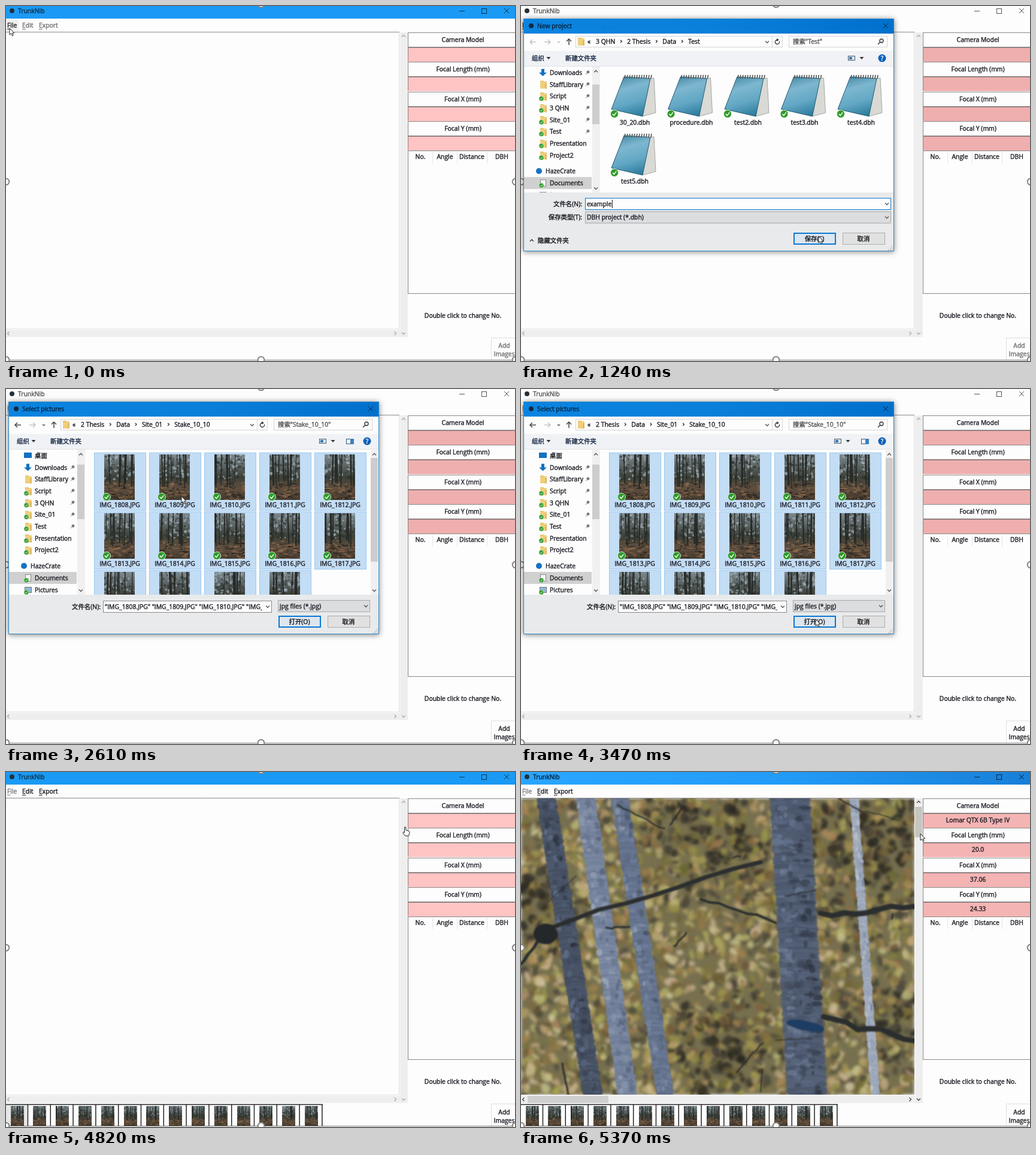
An HTML page with a canvas for the animation above (5450 ms loop, 850 by 592 pixels).

```html
<!DOCTYPE html>
<html lang="en">
<head>
<meta charset="utf-8">
<title>Tree measuring tool</title>
<style>
html, body { margin: 0; width: 100%; height: 100%; overflow: hidden; background: #fdfdfd; }
canvas { display: block; }
</style>
</head>
<body>
<canvas id="stage" width="850" height="592"></canvas>
<script>
const LOOP = 5450, WHITE = '#fdfdfd', INK = '#1c1c24', BLUE = '#0a78d4', NAVY = '#06243e';
const FONT = '10.4px "Open Sans", "Noto Sans CJK SC", "Noto Sans CJK", sans-serif';

// Moments of the story, in ms
const OPEN_NEW = 540, PROJECT = 1650, OPEN_PICK = 2290, SELECT = 2500, PICKED = 3780, THUMBS = 4110, LOADED = 5050;

// Each pointer move: start time and goal
const MOVE_TIME = 310;
const moves = [
  [0, 6, 37], [890, 497, 384], [1710, 814, 565], [2260, 293, 179],
  [2950, 492, 384], [3970, 18, 572], [4470, 667, 92], [LOADED, 667, 103]
];

let c = document.getElementById('stage').getContext('2d');

function rect(x, y, w, h, fill, stroke, width = 1) {
  if (fill) { c.fillStyle = fill; c.fillRect(x, y, w, h); }
  if (stroke) {
    c.strokeStyle = stroke; c.lineWidth = width;
    c.strokeRect(x + width / 2, y + width / 2, w - width, h - width);
  }
}
function trace(points) {
  c.beginPath();
  points.forEach(([x, y]) => c.lineTo(x, y));
}
function line(points, color, width = 1) {
  trace(points);
  c.strokeStyle = color; c.lineWidth = width; c.stroke();
}
function poly(points, fill, stroke) {
  trace(points);
  c.closePath();
  c.fillStyle = fill; c.fill();
  if (stroke) { c.strokeStyle = stroke; c.lineWidth = 1; c.stroke(); }
}
function disc(x, y, r, fill, stroke, width = 1) {
  c.beginPath(); c.arc(x, y, r, 0, 7);
  if (fill) { c.fillStyle = fill; c.fill(); }
  if (stroke) { c.strokeStyle = stroke; c.lineWidth = width; c.stroke(); }
}
function text(s, x, y, color = INK, align = 'left') {
  c.font = FONT; c.textAlign = align;
  c.fillStyle = c.strokeStyle = color; c.lineWidth = 0.4;
  c.fillText(s, x, y + 3.8); c.strokeText(s, x, y + 3.8);
  return c.measureText(s).width;
}
function chevron(x, y, dir, color = '#555', s = 3) {
  const [dx, dy] = { up: [0, -1], down: [0, 1], left: [-1, 0], right: [1, 0] }[dir];
  const h = s / 2;
  line([[x - dx * h - dy * s, y - dy * h - dx * s], [x + dx * h, y + dy * h],
        [x - dx * h + dy * s, y - dy * h + dx * s]], color, 1.3);
}
function arrow(x, y, dir, color) {
  const d = dir === 'left' ? -1 : 1;
  line([[x - 5, y], [x + 5, y]], color, 1.3);
  chevron(x + d * 3, y, dir, color, 4);
}
function triangle(x, y) {
  poly([[x - 3.5, y - 2], [x + 3.5, y - 2], [x, y + 2]], '#333');
}
function cross(x, y, color) {
  line([[x - 4, y - 4], [x + 4, y + 4]], color);
  line([[x - 4, y + 4], [x + 4, y - 4]], color);
}
function check(x, y, r) {
  disc(x, y, r, '#2f9a2a', '#e8f4e6', r / 7);
  line([[x - r * .5, y], [x - r * .1, y + r * .4], [x + r * .5, y - r * .4]], '#fff', r / 4.5);
}
function gradient(x0, y0, x1, y1, colors) {
  const g = c.createLinearGradient(x0, y0, x1, y1);
  colors.forEach((k, i) => g.addColorStop(i / Math.max(1, colors.length - 1), k));
  return g;
}
function clipped(x, y, w, h, drawInside) {
  c.save();
  c.beginPath(); c.rect(x, y, w, h); c.clip();
  drawInside();
  c.restore();
}

// Off-screen pictures
function random(seed) {
  return () => (seed = (seed * 16807) % 2147483647) / 2147483647;
}
function paint(w, h, drawInside) {
  const page = document.createElement('canvas'), screen = c;
  page.width = w; page.height = h;
  c = page.getContext('2d');
  drawInside();
  c = screen;
  return page;
}
function blob(x, y, rx, ry, color, turn = 0) {
  c.beginPath(); c.ellipse(x, y, rx, ry, turn, 0, 7);
  c.fillStyle = color; c.fill();
}
function makeThumb(seed) {
  return paint(51, 76, () => {
    const r = random(seed * 7919 + 11);
    rect(0, 0, 51, 76, gradient(0, 0, 0, 76, ['#7d8a90', '#5c6565', '#3c4038', '#5f4e3e', '#443a2e']));
    for (let i = 0; i < 70; i++) {
      blob(r() * 51, r() * 42, 1 + r() * 2, 1 + r() * 2, r() < .5 ? 'rgba(165,180,188,.6)' : 'rgba(40,46,44,.6)');
      blob(r() * 51, 46 + r() * 30, 1 + r() * 4, .5 + r(), r() < .5 ? 'rgba(150,112,80,.6)' : 'rgba(36,34,28,.6)');
    }
    for (let i = 0; i < 9; i++) {
      const x = r() * 51;
      line([[x, 0], [x + r() * 4 - 2, 44 + r() * 14]], '#272a27', 1 + r() * 1.6);
    }
  });
}
const thumbs = Array.from({ length: 14 }, (_, i) => makeThumb(i + 1));

const PHOTO_W = 657, PHOTO_H = 494;
const photo = paint(PHOTO_W, PHOTO_H, () => {
  const r = random(4242), spread = n => (r() * 2 - 1) * n;
  // Foliage: soft flecks, darker near the shadow centres [x, y, radius]
  const shadows = [[310, 60, 90], [590, 90, 110], [20, 190, 60], [330, 420, 85], [610, 370, 55]];
  c.filter = 'blur(2.5px)';
  rect(0, 0, PHOTO_W, PHOTO_H, '#77704f');
  for (let i = 0; i < 3000; i++) {
    const x = r() * PHOTO_W, y = r() * PHOTO_H;
    const shade = shadows.reduce((sum, [sx, sy, s]) => sum + Math.exp(-((x - sx) ** 2 + (y - sy) ** 2) / (s * s)), 0);
    const light = Math.max(14, 49 - 27 * Math.min(1, shade) + spread(25));
    blob(x, y, 3 + r() * 8, 2 + r() * 6, `hsl(${45 + spread(14)} ${light < 30 ? 12 : 34}% ${light}% / .8)`, r() * 3);
  }
  // Trunks: x at top, x at bottom, width, lightness
  const trunks = [[556, 592, 14, 68], [42, 120, 33, 34], [108, 178, 33, 54], [165, 241, 29, 48], [449, 478, 68, 38]];
  c.filter = 'blur(1.2px)';
  for (const [x0, x1, w, light] of trunks) {
    const place = y => x0 + (x1 - x0) * y / PHOTO_H;
    for (let y = 0; y <= PHOTO_H; y += 3) blob(place(y), y, w / 2 + spread(1.5), 5, `hsl(219 17% ${light + spread(3)}%)`);
    for (let i = 0; i < w * 5; i++) {
      const y = r() * PHOTO_H, side = spread(.42);
      const tone = light + spread(14) - side * 18;
      blob(place(y) + side * w, y, 2 + r() * w * .12, 2 + r() * 5, `hsl(219 17% ${tone}% / .6)`);
    }
  }
  // Branches: start, end, width; then random twigs
  const branch = (x0, y0, x1, y1, w) => {
    const points = Array.from({ length: 9 }, (_, i) => [x0 + (x1 - x0) * i / 8, y0 + (y1 - y0) * i / 8 + spread(w * .7)]);
    line(points, '#2b2e2f', w);
  };
  c.lineCap = c.lineJoin = 'round';
  branch(40, 215, 400, 108, 7);
  branch(500, 196, PHOTO_W, 182, 9);
  branch(505, 364, PHOTO_W, 406, 9);
  branch(300, 166, 425, 206, 4);
  branch(0, 275, 45, 220, 5);
  for (let i = 0; i < 14; i++) {
    const x = r() * PHOTO_W, y = r() * PHOTO_H;
    branch(x, y, x + spread(90), y + spread(60), 1 + r() * 2);
  }
  blob(41, 226, 20, 17, '#25282b');
  blob(475, 379, 32, 8, '#1d3d63', .2);
});

// Main window
function themeAt(t, dialog) {
  if (dialog) return { bar: [WHITE], ink: '#555', pink: '#efafaf' };
  if (t >= PICKED && t < 4280) return { bar: ['#0a88e2', '#0a84dd', '#006ac4'], ink: NAVY, pink: '#efafaf' };
  if (t >= LOADED) return { bar: ['#2aa6ff', '#229cf8', '#187fd8'], ink: NAVY, pink: '#f5b4b4' };
  return { bar: ['#1a9af4'], ink: '#0b3350', pink: '#ffc4c4' };
}
function menuItem(s, x, color) {
  text(s, x, 32, color);
  line([[x, 38.5], [x + c.measureText(s[0]).width, 38.5]], color);
}
function titleBar(theme) {
  rect(0, 0, 850, 21, gradient(0, 0, 850, 0, theme.bar));
  disc(10, 8, 4, '#24303a');
  text('TrunkNib', 20, 8, theme.ink);
  line([[757, 8.5], [766, 8.5]], theme.ink);
  rect(794, 4, 9, 9, null, theme.ink);
  cross(836, 8, theme.ink);
}
function viewer(loaded) {
  const ink = loaded ? '#444' : '#aaa';
  line([[0, 43.5], [657, 43.5]], '#8c8c8c');
  line([[656.5, 44], [656.5, 539]], '#dcdcdc');
  line([[0, 538.5], [657, 538.5]], '#e2e2e2');
  rect(658, 44, 13, 508, '#eeeeee');
  rect(0, 540, 658, 12, '#eeeeee');
  if (loaded) {
    c.drawImage(photo, 0, 44);
    rect(658, 58, 12, 51, '#c6c6be');
    rect(11, 540, 135, 12, '#cfcfcf');
  }
  chevron(664, 50, 'up', ink); chevron(664, 546, 'down', ink);
  chevron(4, 546, 'left', ink); chevron(650, 546, 'right', ink);
}
function sidePanel(loaded, pink) {
  const fields = {
    'Camera Model': 'Lomar QTX 6B Type IV', 'Focal Length (mm)': '20.0',
    'Focal X (mm)': '37.06', 'Focal Y (mm)': '24.33'
  };
  Object.entries(fields).forEach(([label, value], i) => {
    const y = Math.round(44 + i * 49.4);
    rect(671, y, 181, 25, WHITE, '#8a8a8a');
    rect(671, y + 25, 181, 24, pink);
    line([[850, y + 25.5], [671.5, y + 25.5], [671.5, y + 48]], '#947a7a');
    text(label, 763, y + 12, INK, 'center');
    if (loaded) text(value, 763, y + 36.5, INK, 'center');
  });
  rect(671, 241, 181, 239, WHITE, '#8a8a8a');
  [['No.', 692], ['Angle', 733], ['Distance', 778], ['DBH', 828]].forEach(([s, x]) => text(s, x, 251, INK, 'center'));
  [712.5, 753.5, 803.5].forEach(x => line([[x, 243], [x, 262]], '#e4e4e4'));
  text('Double click to change No.', 763, 516, INK, 'center');
}
function thumbStrip(t) {
  thumbs.forEach((img, i) => {
    const x = i * 37.8, active = i === 0 && t > 4280 && t < LOADED;
    rect(x, 555, 36, 36, active ? '#e6e6e6' : WHITE);
    c.drawImage(img, x + 7.5, 557, 22, 33);
    line([[x + 36.5, 554], [x + 36.5, 590]], '#222', 1.5);
  });
  line([[0, 554.5], [529, 554.5]], '#222', 1.5);
}
function mainWindow(t, theme) {
  const project = t >= PROJECT, loaded = t >= LOADED, strip = t >= THUMBS;
  const ink = project ? INK : '#707070';
  rect(0, 0, 850, 592, WHITE);
  titleBar(theme);
  if (!project) rect(0, 22, 21, 20, '#f0f0f0');
  menuItem('File', 2, project ? '#777' : INK);
  menuItem('Edit', 27, ink);
  menuItem('Export', 55, ink);
  viewer(loaded);
  sidePanel(loaded, theme.pink);
  const y = strip ? 567 : 566;
  rect(810, 553, 42, 38, WHITE, '#e0e0e0');
  text('Add', 832, y, ink, 'center');
  text('Images', 832, y + 14, ink, 'center');
  if (strip) thumbStrip(t);
}
function frameHandles() {
  const handle = (x, y) => disc(x, y, 5.3, WHITE, '#868686', 2);
  line([[0, 590.5], [850, 590.5]], '#777');
  for (const x of [0, 851]) { handle(x, 293); handle(x, 590); }
  handle(426, -3); handle(426, 590);
}

// File dialogs
function folder(x, y) {
  rect(x, y - 6, 6, 3, '#d9b25c');
  rect(x, y - 5, 11, 12, '#f0cf7c');
  rect(x + 8, y - 2, 3, 9, '#e2bb62');
}
function button(s, x, main) {
  rect(x, 378, 71, 20, main ? '#dde6ee' : '#e1e1e1', main ? BLUE : '#adadad', main ? 2 : 1);
  text(s, x + 35, 388, INK, 'center');
}
function field(x, y, w, value, { fill = '#dbdddf', edge = '#a8a8a8' } = {}) {
  rect(x, y, w, 20, fill, edge);
  clipped(x, y, w - 16, 20, () => text(value, x + 3, y + 10));
  chevron(x + w - 7, y + 10, 'down');
}
function sidebar(pick, bottom) {
  const row = 19.7, top = pick ? 111 : 111 - row;
  ['桌面', 'Downloads', 'StaffLibrary', 'Script', '3 QHN', 'Site_01', 'Test', 'Presentation', 'Project2'].forEach((s, i) => {
    const y = top + i * row;
    if (i === 0) rect(30, y - 5, 13, 9, '#1471c0');
    else if (i === 1) { rect(34, y - 6, 5, 7, '#1471c0'); poly([[30, y], [43, y], [36.5, y + 6]], '#1471c0'); }
    else folder(32, y);
    if (i > 2) check(34, y + 4, 4);
    text(s, 48, y);
    if (i > 0 && i < 7) {
      line([[108, y + 3], [111, y]], '#777');
      poly([[109, y - 1], [112, y - 4], [115, y - 1], [112, y + 2]], '#777');
    }
  });
  const cloud = top + 184, y = cloud + 20;
  disc(30, cloud, 5, '#1673c4');
  text('HazeCrate', 41, cloud);
  rect(5, y - 10, 113, 20, '#d0d0d0');
  rect(32, y - 6, 10, 12, '#f6f6f6', '#888');
  check(34, y + 4, 4);
  text('Documents', 48, y);
  rect(31, y + 15, 12, 10, '#8fb8d8', '#777');
  check(34, y + 24, 4);
  text('Pictures', 48, y + 20);
  rect(4, 101, 127, 3, WHITE);
  rect(119, 101, 13, bottom - 101, '#f0f0f0');
  rect(119, pick ? 126 : 131, 12, pick ? 91 : 66, '#cdcdcd');
  chevron(125, 109, 'up'); chevron(125, bottom - 7, 'down');
}
function notebook(x, y, name) {
  poly([[x + 62, y + 9], [x + 71, y + 7], [x + 74, y + 65], [x + 52, y + 71]], '#d9d9d5', '#a6a6a2');
  const cover = gradient(x + 20, y, x + 40, y + 72, ['#3f829f', '#7db7cf', '#62a7c4', '#2b7a9c']);
  poly([[x + 21, y + 5], [x + 65, y + 8], [x + 52, y + 71], [x, y + 59]], cover, '#245a70');
  for (let i = 0; i < 12; i++) line([[x + 23 + i * 4, y + 2], [x + 22 + i * 4, y + 8]], '#555', 1.6);
  check(x + 5, y + 67, 6.5);
  text(name, x + 39, y + 81, INK, 'center');
}
function pictureCell(i, selected) {
  const x = 147 + i % 5 * 92, y = 106 + Math.floor(i / 5) * 98;
  if (selected) rect(x, y, 87, 97, '#c3ddf5', '#9cc8ee');
  c.drawImage(thumbs[i], x + 17, y + 3);
  check(x + 21, y + 74, 6.5);
  text(`IMG_${1808 + i}.JPG`, x + 43, y + 87.5, INK, 'center');
}
function addressBar(pick) {
  const path = pick ? ['2 Thesis', 'Data', 'Site_01', 'Stake_10_10'] : ['3 QHN', '2 Thesis', 'Data', 'Test'];
  rect(5, 46, 617, 29, WHITE);
  arrow(20, 60, 'left', pick ? '#333' : '#bbb');
  arrow(44, 60, 'right', '#bbb');
  chevron(63, 60, 'down', pick ? '#555' : '#bbb', 2);
  line([[80, 65], [80, 55]], '#333', 1.4); chevron(80, 57, 'up', '#333', 4);
  rect(91, 50, 346, 19, WHITE, '#d5d5d5');
  folder(95, 59);
  text('«', 111, 59);
  let x = 125;
  path.forEach((s, i) => {
    if (i) { chevron(x + 10, 59, 'right', '#333', 2.2); x += 20; }
    x += text(s, x, 59);
  });
  chevron(411, 60, 'down');
  line([[419.5, 50], [419.5, 69]], '#d5d5d5');
  c.beginPath(); c.arc(428, 60, 3.6, -.3, 4.6); c.strokeStyle = '#333'; c.lineWidth = 1.3; c.stroke();
  poly([[427, 54], [431, 56.5], [427, 59]], '#333');
  rect(447, 50, 165, 19, WHITE, '#d5d5d5');
  text(`搜索"${path[3]}"`, 454, 59, '#555');
  disc(602, 58, 3, null, '#333', 1.3);
  line([[600, 60], [596, 64]], '#333', 1.5);
}
function toolBar(pick) {
  const view = pick ? 523 : 546;
  rect(5, 75, 617, 26, '#f0f2f5');
  line([[5, 100.5], [622, 100.5]], '#e0e2e5');
  text('组织', 18, 87, '#1c2c48'); text('新建文件夹', 74, 87, '#1c2c48');
  rect(view, 83, 12, 8, '#e8f0f8', '#456');
  rect(view + 2, 85, 5, 4, '#2f78b8');
  triangle(46, 87); triangle(view + 23, 87);
  if (pick) { rect(568, 83, 13, 9, WHITE, '#357'); rect(575, 83, 6, 9, '#3a80c0'); }
  disc(603, 87, 6.5, '#0d60b4');
  text('?', 603, 87, '#fff', 'center');
}
function fileList(t, pick, bottom) {
  rect(5, 101, 617, bottom - 101, WHITE);
  sidebar(pick, bottom);
  if (pick) {
    thumbs.forEach((_, i) => pictureCell(i, t >= SELECT));
    rect(609, 102, 12, 241, '#f0f0f0');
    rect(609, 115, 12, 173, '#cdcdcd');
    chevron(615, 109, 'up'); chevron(615, 336, 'down');
  } else {
    ['30_20', 'procedure', 'test2', 'test3', 'test4', 'test5'].forEach((s, i) =>
      notebook(151 + i % 5 * 94.5, 113 + Math.floor(i / 5) * 98, s + '.dbh'));
  }
}
function dialog(t, pick) {
  const bottom = pick ? 343 : 311;
  c.save();
  c.shadowColor = 'rgba(0,0,0,.5)'; c.shadowBlur = 9; c.shadowOffsetY = 1;
  rect(4, 21, 619, 388, '#e8eaeb');
  c.restore();
  rect(4, 21, 619, 25, gradient(4, 0, 622, 0, ['#0a84e0', '#0a80da', '#0070cc']));
  disc(17, 33, 4, '#14283a');
  text(pick ? 'Select pictures' : 'New project', 27, 33, NAVY);
  cross(609, 33, NAVY);
  addressBar(pick);
  toolBar(pick);
  clipped(5, 101, 617, bottom - 101, () => fileList(t, pick, bottom));
  if (pick) {
    const names = t < SELECT ? '' : [0, 1, 2, 3].map(i => `"IMG_${1808 + i}.JPG"`).join(' ');
    text('文件名(N):', 158, 363, INK, 'right');
    field(162, 353, 282, names, { fill: WHITE, edge: '#8a8a8a' });
    field(454, 352, 154, 'jpg files (*.jpg)');
  } else {
    const typed = 'example'.slice(0, Math.max(0, Math.floor((t - 620) / 50)));
    text('文件名(N):', 102, 330, INK, 'right');
    field(107, 320, 511, typed, { fill: WHITE, edge: BLUE });
    const end = 111 + c.measureText(typed).width;
    line([[end, 323], [end, 337]], '#111');
    text('保存类型(T):', 102, 352, INK, 'right');
    field(107, 342.5, 511, 'DBH project (*.dbh)');
    chevron(18, 391, 'up', '#333');
    text('隐藏文件夹', 28, 391);
  }
  button(pick ? '打开(O)' : '保存(S)', 455, true);
  button('取消', 537, false);
  for (let i = 0; i < 3; i++) for (let j = 0; j <= i; j++) rect(619 - j * 3, 400 + i * 3, 1.5, 1.5, '#aaa');
  rect(4, 21, 619, 388, null, '#2b86c8');
}

// Pointer
function pointerAt(t) {
  let [, x, y] = moves[0];
  for (const [start, goalX, goalY] of moves) {
    const k = Math.min(1, Math.max(0, (t - start) / MOVE_TIME)), ease = k * k * (3 - 2 * k);
    x += (goalX - x) * ease;
    y += (goalY - y) * ease;
  }
  return [x, y];
}
function pointer(t) {
  c.save();
  c.translate(...pointerAt(t));
  c.lineJoin = 'round';
  if (t >= 4200 && t < LOADED) {
    poly([[-1.5, 0], [.5, 0], [1, 5], [6, 6.5], [7, 8.5], [5.5, 14.5], [-.5, 14.5], [-4, 9.5], [-3.5, 8], [-1.5, 9]], '#fff', '#222');
  } else {
    poly([[0, 0], [0, 11], [2.5, 8.8], [4.4, 12.7], [6.2, 11.9], [4.4, 8.1], [7.8, 8]], '#fff', '#222');
  }
  c.restore();
}

function draw(t) {
  const create = t >= OPEN_NEW && t < PROJECT, pick = t >= OPEN_PICK && t < PICKED;
  mainWindow(t, themeAt(t, create || pick));
  frameHandles();
  if (create || pick) dialog(t, pick);
  pointer(t);
}
const start = performance.now();
function tick(now) {
  draw(Math.max(0, now - start) % LOOP);
  requestAnimationFrame(tick);
}
draw(0);
requestAnimationFrame(tick);
</script>
</body>
</html>
```
